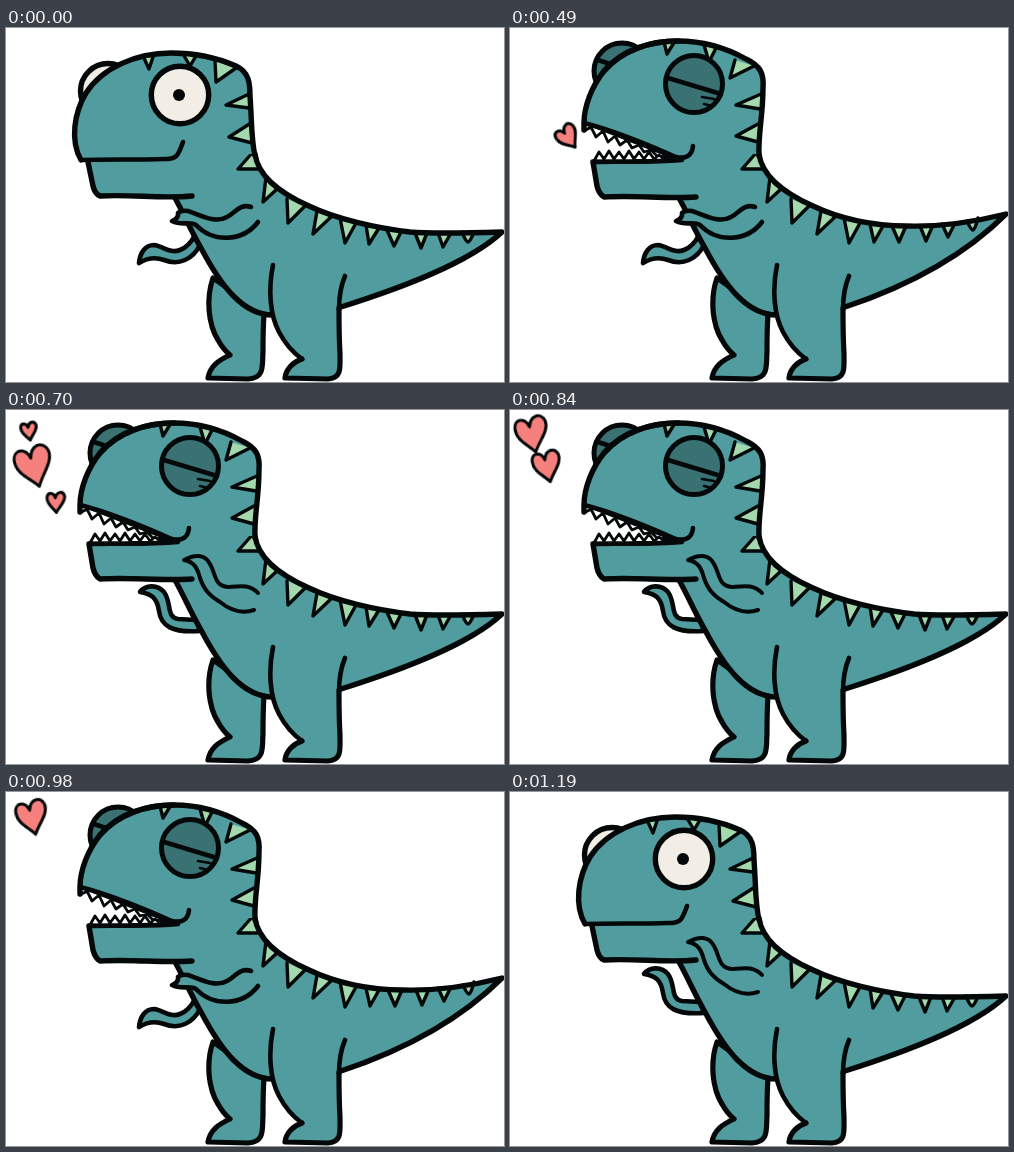
Recreate the animation shown at these times as an HTML page. Size 498 px wide and 354 px high, loop 1.33 s.

```html
<!DOCTYPE html>
<html lang="en">
<head>
<meta charset="utf-8">
<title>Dinosaur blowing hearts</title>
<style>
  html, body { margin: 0; width: 100%; height: 100%; overflow: hidden; background: #fff; }
  svg { display: block; width: 498px; height: 354px; }
  path, circle { stroke-linecap: round; stroke-linejoin: round; }
  .skin { fill: #519c9e; }
  .line { fill: none; stroke: #050808; stroke-width: 4.6; }
  .edge { stroke-width: 5.4; }
  .limb { fill: #519c9e; stroke: #050808; stroke-width: 4.6; }
  .leg { stroke-width: 5.2; }
  .spike { fill: #a3d9ad; stroke: #050808; stroke-width: 3.4; }
  .white { fill: #f2eee5; stroke: #050808; stroke-width: 5.4; }
  .lid { fill: #3a7274; stroke: #050808; stroke-width: 5; }
  .tooth { fill: #fff; stroke: #050808; stroke-width: 2.8; }
  .thin { stroke-width: 2.6; }
  .love { fill: #f5807e; stroke: #050808; stroke-width: 3; vector-effect: non-scaling-stroke; }

  .shut, .open, .down, .up, .low, .high, .heart, .pop { animation: 1330ms step-end infinite; }
  .shut { animation-name: shut; }
  .open { animation-name: open; }
  .down { animation-name: down; }
  .up { animation-name: up; }
  .low { animation-name: low; }
  .high { animation-name: high; }
  #h1 { animation-name: rise1; }
  #h2 { animation-name: rise2; }
  #h3 { animation-name: rise3; }
  #p1 { animation-name: pop1; }
  #p2 { animation-name: pop2; }
  #p3 { animation-name: pop3; }

  /* one beat is 70 ms, 1/19 of the loop */
  @keyframes shut { 0%, 89.473%, 100% { visibility: visible } 36.842% { visibility: hidden } }
  @keyframes open { 0%, 89.473%, 100% { visibility: hidden } 36.842% { visibility: visible } }
  @keyframes down {
    0%, 36.842%, 68.421% { visibility: visible }
    21.052%, 52.631%, 89.473%, 100% { visibility: hidden }
  }
  @keyframes up {
    0%, 36.842%, 68.421% { visibility: hidden }
    21.052%, 52.631%, 89.473%, 100% { visibility: visible }
  }
  @keyframes low {
    0%, 52.631%, 89.473%, 100% { visibility: visible }
    36.842%, 68.421% { visibility: hidden }
  }
  @keyframes high {
    0%, 52.631%, 89.473%, 100% { visibility: hidden }
    36.842%, 68.421% { visibility: visible }
  }
  @keyframes rise1 {
    0%, 57.894%, 100% { transform: scale(0) }
    36.842% { transform: translate(58px, 109px) rotate(-35deg) scale(.62) }
    42.105% { transform: translate(46px, 84px) rotate(-18deg) scale(.6) }
    47.368% { transform: translate(34px, 52px) rotate(-12deg) scale(.54) }
    52.631% { transform: translate(23px, 21px) rotate(-8deg) scale(.46) }
  }
  @keyframes rise2 {
    0%, 68.421%, 100% { transform: scale(0) }
    42.105% { transform: translate(58px, 109px) rotate(-35deg) scale(.62) }
    47.368% { transform: translate(42px, 83px) rotate(-22deg) scale(.85) }
    52.631% { transform: translate(28px, 56px) rotate(-15deg) scale(1.05) }
    57.894% { transform: translate(25px, 38px) rotate(-12deg) scale(1.02) }
    63.157% { transform: translate(22px, 24px) rotate(-12deg) scale(.92) }
  }
  @keyframes rise3 {
    0%, 78.947%, 100% { transform: scale(0) }
    47.368% { transform: translate(58px, 110px) rotate(-35deg) scale(.42) }
    52.631% { transform: translate(50px, 92px) rotate(-2deg) scale(.52) }
    57.894% { transform: translate(44px, 74px) rotate(-9deg) scale(.68) }
    63.157% { transform: translate(37px, 56px) rotate(-12deg) scale(.8) }
    68.421% { transform: translate(30px, 39px) rotate(-16deg) scale(.88) }
    73.684% { transform: translate(26px, 25px) rotate(-12deg) scale(.88) }
  }
  @keyframes pop1 { 0%, 63.157%, 100% { visibility: hidden } 57.894% { visibility: visible } }
  @keyframes pop2 { 0%, 73.684%, 100% { visibility: hidden } 68.421% { visibility: visible } }
  @keyframes pop3 { 0%, 84.21%, 100% { visibility: hidden } 78.947% { visibility: visible } }
</style>
</head>
<body>
<svg viewBox="0 0 498 354">
  <defs>
    <path id="heart" class="love" d="M0 20C-6 11-18 4-17-9C-16-20-4-20-1-8C2-20 14-22 17-11C19 0 6 9 0 20Z"/>
    <path id="specks" class="line thin" d="M28 5Q33 5 35 10M8 9L7 11M7 18L5 21"/>
    <path id="ridge" class="spike" d="M247 124L232 141L252 141M260 149L257 174L271 161M281 171L282 195L299 178M311 183L307 206L326 188M334 190L339 215L350 195"/>
  </defs>

  <!-- far arm -->
  <path class="limb down" d="M133 235C134 225 139 217 148 217C157 218 164 226 174 222C182 219 186 213 189 207L194 217C187 231 173 238 158 232C150 229 141 230 133 235Z"/>
  <path class="limb up" d="M134 182C140 174 152 175 158 182C166 193 160 207 172 209L190 210L194 221C166 223 155 216 153 201C151 188 146 184 134 182Z"/>

  <!-- far leg -->
  <path class="limb leg" d="M207 250C200 270 202 296 212 312Q217 321 224 327C213 332 204 338 202 350L242 351C259 350 256 338 257 324C257 308 257 300 258 286Z"/>

  <!-- tail and trunk -->
  <g class="low">
    <path class="skin" d="M168 168C178 186 185 203 195 220C215 258 237 287 267 287L335 280C395 261 460 235 496 204C463 205 428 206 404 204C370 200 330 191 303 178C272 164 252 148 249 126L200 110Z"/>
    <use href="#ridge"/>
    <path class="spike" d="M360 197L363 216L373 200M381 202L388 218L395 204M409 205L415 220L421 205M432 205L437 219L445 205M456 204Q460 214 462 214T468 204"/>
    <path class="line edge" d="M335 279C395 260 463 235 496 204C463 205 428 206 404 204C370 200 330 191 303 178C272 164 252 148 249 126"/>
  </g>
  <g class="high">
    <path class="skin" d="M168 168C178 186 185 203 195 220C215 258 237 287 267 287L335 280C395 261 452 230 496 186C460 195 428 199 396 198C364 198 330 191 303 178C272 164 252 148 249 126L200 110Z"/>
    <use href="#ridge"/>
    <path class="spike" d="M360 196L364 214L373 198M382 198L389 214L396 198M410 198L416 213L423 197M432 196L438 209L445 195M457 193Q461 202 463 202T468 190"/>
    <path class="line edge" d="M335 279C395 259 452 230 496 186C460 195 428 199 396 198C364 198 330 191 303 178C272 164 252 148 249 126"/>
  </g>
  <path class="line edge" d="M169 170C178 186 185 203 195 220C215 258 237 287 267 287"/>

  <!-- near leg -->
  <path class="skin" d="M267 237C262 262 264 287 273 304Q282 321 296 331C287 334 280 341 279 350L322 351C336 350 334 340 334 325C333 292 332 270 339 248Z"/>
  <path class="line leg" d="M296 331C287 334 280 341 279 350L322 351C336 350 334 340 334 325C333 310 333 295 333 280"/>
  <path class="line" d="M267 237C262 262 264 287 273 304Q282 321 296 331M333 282Q333 262 339 248"/>

  <!-- head, mouth shut -->
  <g class="shut">
    <circle class="white" cx="102" cy="63" r="27.5"/>
    <path class="skin" d="M75 132C64 113 68 85 80 65C96 40 130 25 165 25C190 25 214 31 230 38C243 44 244 55 244 68C246 95 245 110 249 126L225 126L200 185L168 168L93 168Q89 166 88 160L82 134Z"/>
    <path class="spike" d="M137 28L143 41L148 26M177 26L184 38L190 28M209 33L210 54L230 40M243 66L220 77L243 80M245 95L223 109L246 115"/>
    <path class="line edge" d="M82 134L87 158Q89 166 94 168C125 166 155 171 186 168"/>
    <path class="line" d="M177 114C172 128 171 131 158 131C130 132 100 131 75 132"/>
    <path class="line edge" d="M75 132C64 113 68 85 80 65C96 40 130 25 165 25C190 25 214 31 230 38C243 44 244 55 244 68C246 95 245 110 249 128"/>
    <circle class="white" cx="174" cy="67" r="28.7"/>
    <circle cx="173" cy="67" r="6" fill="#050808"/>
  </g>

  <!-- head, mouth open -->
  <g class="open">
    <circle class="lid" cx="112" cy="43" r="28"/>
    <path class="line" d="M88 32L112 40"/>
    <path class="skin" d="M74 95C74 78 82 58 94 43C112 22 140 13 168 13C196 13 218 21 236 31C251 38 254 46 253 60C253 88 248 105 249 126L225 126L200 185L168 168L93 169Q89 166 88 160L83 133L172 132Z"/>
    <path class="tooth" d="M75 95L74 103L81 99L86 109L93 103L98 114L105 108L110 117L117 112L122 120L129 117L134 124L141 122L147 128L164 130Z"/>
    <path class="tooth" d="M84 133L89 124L94 131L99 123L104 131L109 124L114 131L119 123L124 131L129 124L134 131L139 124L144 131L149 127L154 131L164 132Z"/>
    <path class="line edge" d="M83 134L87 158Q89 166 94 169C125 167 155 171 186 169"/>
    <path class="line" d="M172 132C140 135 110 133 83 134M183 118C182 128 176 131 166 129C145 120 110 104 74 95"/>
    <path class="line edge" d="M74 102L74 95C74 78 82 58 94 43C112 22 140 13 168 13"/>
    <path class="spike" d="M154 14L157 26L165 13M194 17L199 34L206 20M225 32L220 50L244 38M251 66L226 77L250 81M248 96L226 108L248 114"/>
    <path class="line edge" d="M94 43C112 22 140 13 168 13C196 13 218 21 236 31C251 38 254 46 253 60C253 88 248 105 249 128"/>
    <circle class="lid" cx="184" cy="56" r="28.5"/>
    <path class="line" d="M158 50L211 66"/>
    <path class="line thin" d="M192 69L204 71M194 76L202 78"/>
  </g>

  <!-- near arm -->
  <g class="down">
    <path class="skin" d="M245 179C234 175 229 185 221 189C209 196 194 187 182 183Q175 182 172 185Q173 190 166 193C176 198 184 193 190 197C206 214 236 215 252 194Z"/>
    <path class="line" d="M245 179C234 175 229 185 221 189C209 196 194 187 182 183Q175 182 172 185Q173 190 166 193C176 198 184 193 190 197C206 214 236 215 252 194"/>
  </g>
  <g class="up">
    <path class="skin" d="M252 183C244 174 234 176 222 177C208 176 210 164 204 154C199 144 189 144 178 150C188 152 191 157 194 168C198 180 204 186 214 192C224 200 236 204 248 200Z"/>
    <path class="line" style="stroke-width:4" d="M252 183C244 174 234 176 222 177C208 176 210 164 204 154C199 144 189 144 178 150C188 152 191 157 194 168C198 180 204 186 214 192C224 200 236 204 248 200"/>
  </g>

  <!-- hearts -->
  <g id="h1" class="heart"><use href="#heart"/></g>
  <g id="h2" class="heart"><use href="#heart"/></g>
  <g id="h3" class="heart"><use href="#heart"/></g>
  <g id="p1" class="pop"><use href="#specks"/></g>
  <g id="p2" class="pop"><use href="#specks"/></g>
  <g id="p3" class="pop"><use href="#specks" x="3" y="1"/></g>
</svg>
</body>
</html>
```
